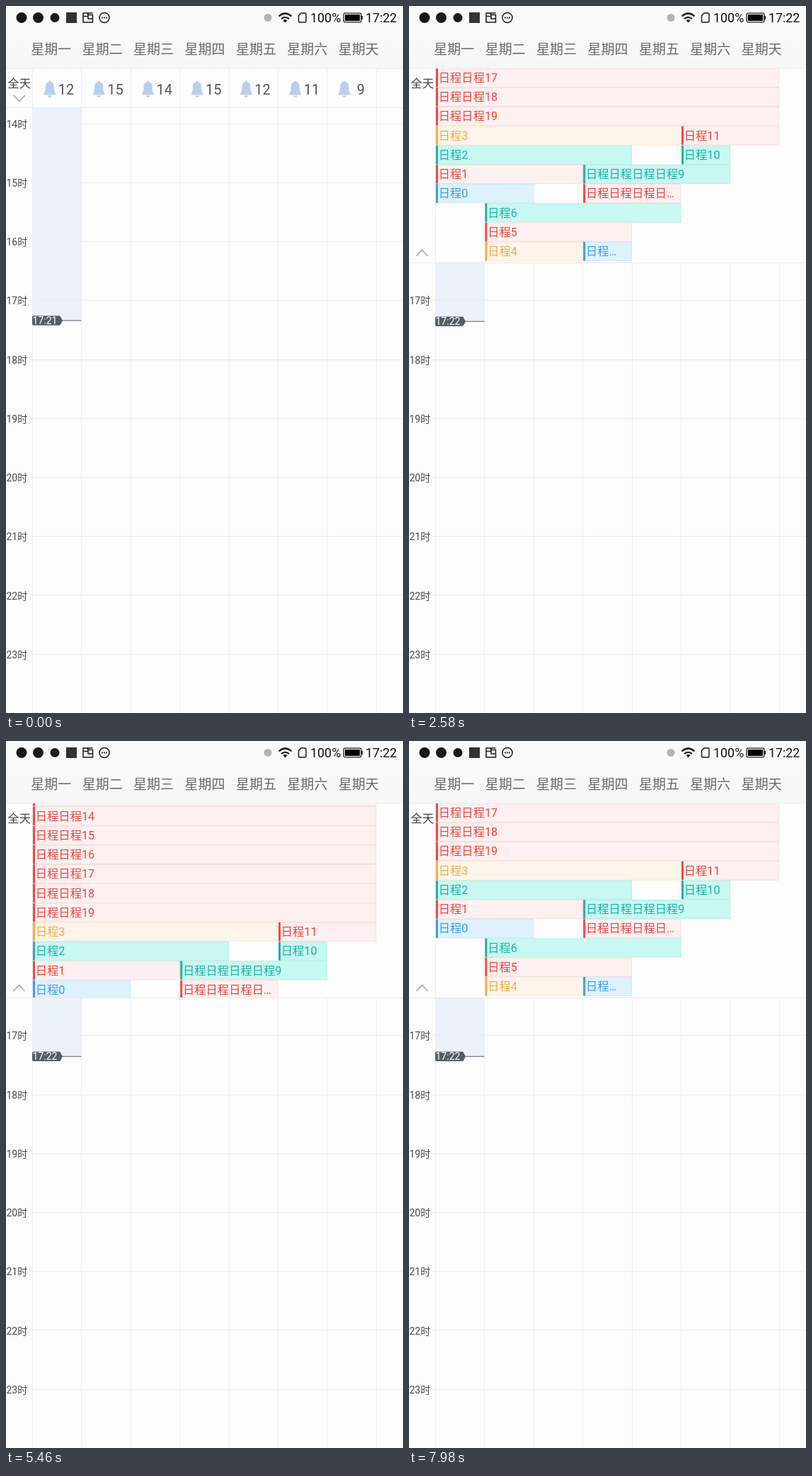
An HTML page that plays this animation: 561x998 px, repeating every 8 s.

```html
<!DOCTYPE html>
<html lang="zh-CN">
<head>
<meta charset="utf-8">
<title>周日程</title>
<style>
html, body { margin: 0; width: 100%; height: 100%; overflow: hidden; background: #fcfcfd; }
svg { display: block; width: 100vw; height: 100vh; }
text { font-family: Roboto, "Noto Sans CJK SC", "Noto Sans CJK", sans-serif; white-space: pre; }
</style>
</head>
<body>
<svg id="stage" viewBox="0 0 561 998">
  <defs>
    <linearGradient id="bar" x1="0" y1="0" x2="0" y2="1">
      <stop offset="0" stop-color="#fafafa"/>
      <stop offset="1" stop-color="#f7f7f7"/>
    </linearGradient>
    <clipPath id="panel"><rect x="0" y="87.5" width="561" height="274.5"/></clipPath>
  </defs>
  <rect width="561" height="998" fill="#fcfcfd"/>
  <g id="grid"></g>
  <g id="now"></g>
  <g id="closed"></g>
  <g id="open">
    <rect y="88" width="561" height="274" fill="#fdfdfd"/>
    <g clip-path="url(#panel)"><g id="events"></g></g>
  </g>
  <g id="head"></g>
  <g id="status" fill="none" stroke="#1a1a1a" stroke-width="1.5">
    <circle cx="22" cy="16.5" r="7.5" fill="#161616" stroke="none"/>
    <circle cx="45.500" cy="16.500" r="7.500" fill="#1a1a1a" stroke="none"/>
    <circle cx="69" cy="16.500" r="6.500" fill="#1a1a1a" stroke="none"/>
    <rect x="85" y="9" width="15" height="15" fill="#333" stroke="none"/>
    <path d="M109 10H114.500L116 12.500H122.500V23H109ZM109 14.500H116V10H122.500M116 14.500V18H122.500"/>
    <circle cx="139" cy="16.500" r="7"/>
    <path d="M135 16.500h1.800m1.300 0h1.800m1.300 0h1.800" stroke-width="1.800"/>
    <circle cx="370" cy="16.500" r="5.500" fill="#b4b4b4" stroke="none"/>
    <path d="M385.500 14.500Q394.500 6.500 403.500 14.500M389 18.200Q394.500 13.500 400 18.200" stroke-width="2.200"/>
    <path d="M391.500 20.200Q394.500 18 397.500 20.200L394.500 23.500Z" fill="#1a1a1a" stroke="none"/>
    <path d="M417 10H422.500Q424 10 424 11.500V21.500Q424 23 422.500 23H415Q413.500 23 413.500 21.500V13.500Z"/>
    <rect x="477.200" y="10.200" width="24.600" height="12.600" rx="1.500" stroke-width="1.300"/>
    <rect x="479" y="12" width="21" height="9" fill="#000" stroke="none"/>
    <rect x="502" y="14" width="2" height="5" fill="#1a1a1a" stroke="none"/>
  </g>
</svg>
<script>
const NS = 'http://www.w3.org/2000/svg';
const $ = id => document.getElementById(id);
const LOOP = 8000, OPEN_AT = 780;
const LEFT = 37, COL = 69.4, ROW = 27.25, TOP = 87.6, MAX = 136.25;
const LINE = '#ececf0';
const colX = c => LEFT + COL * c;

function add(parent, tag, attrs, str) {
  const el = document.createElementNS(NS, tag);
  for (const k in attrs) el.setAttribute(k, attrs[k]);
  if (str !== undefined) el.textContent = str;
  parent.appendChild(el);
  return el;
}
const rect = (g, x, y, width, height, fill, more) => add(g, 'rect', { x, y, width, height, fill, ...more });
const path = (g, d, stroke, more) => add(g, 'path', { d, stroke, fill: 'none', ...more });
const label = (g, x, y, size, fill, str, more) => add(g, 'text', { x, y, 'font-size': size, fill, ...more }, str);

// Hour grid
const grid = $('grid');
const today = rect(grid, LEFT, 144, COL, 300, '#ecf2fa');
for (let c = 0; c < 8; c++) path(grid, `M${Math.round(colX(c))}.5 88V998`, LINE);
for (let h = 0; h < 10; h++) {
  const y = 166 + 83.22 * h;
  path(grid, `M33 ${Math.round(y - 0.3)}.5H561`, LINE);
  label(grid, 0.5, y + 5.8, 14, '#4a4a4a', 14 + h + '时');
}

// Current time marker
const now = $('now');
path(now, 'M78 444H106.500', '#6f757c', { 'stroke-width': 1.2 });
add(now, 'path', { d: 'M39 437.300H75Q77 437.300 77.500 439.500L80 444L77.500 448.700Q77 450.800 75 450.800H39Q37 450.800 37 448.800V439.300Q37 437.300 39 437.300Z', fill: '#555d66' });
const clock = label(now, 37.5, 449, 14, '#fff', '');

// Collapsed all-day strip
const closed = $('closed');
rect(closed, 0, 88, 561, 56, '#fdfdfd');
for (let c = 0; c < 8; c++) path(closed, `M${Math.round(colX(c))}.5 88V144`, LINE);
path(closed, 'M0 143.500H561', '#e9e9ec');
[12, 15, 14, 15, 12, 11, 9].forEach((n, c) => {
  add(closed, 'path', {
    d: 'M0-12Q1.500-12 1.700-10.200Q6-9 6-3.500Q6 3 8.500 6.500Q8.500 8 7 8H-7Q-8.500 8-8.500 6.500Q-6 3-6-3.500Q-6-9-1.700-10.200Q-1.500-12 0-12ZM-3 9H3Q2.500 11.500 0 11.500Q-2.500 11.500-3 9Z',
    fill: '#b9d0ea', transform: `translate(${61.8 + COL * c} 117.500)`
  });
  label(closed, 85 + COL * c, 125, 20, '#555', n, { 'text-anchor': 'middle' });
});

// Expanded all-day events
const INK = {
  red: ['#f04a4a', '#e8463f', '#fdf0f0', '#fadcdc'],
  gold: ['#f6ae45', '#f2ac45', '#fdf5ec', '#f8ead2'],
  teal: ['#22b2a4', '#18b5a6', '#c9f7f2', '#b5efe8'],
  blue: ['#3d9fe8', '#3c9fe4', '#def2fe', '#cde8f8']
};
const events = $('events');
function event(row, from, to, ink, str) {
  const [edge, text, fill, border] = INK[ink];
  const x = colX(from) + 1, y = TOP + ROW * row, w = colX(to) - x;
  rect(events, x + 0.5, y + 0.5, w - 0.5, ROW - 1, fill, { stroke: border });
  rect(events, x, y + 0.3, 3, ROW - 0.8, edge);
  label(events, x + 3.8, y + 19.3, 16.3, text, str);
}
const D = '日程';
event(0, 0, 7, 'red', D.repeat(14) + '…');
for (let i = 1; i < 8; i++) event(i, 0, 7, 'red', D + D + (12 + i));
event(8, 0, 5, 'gold', D + 3);
event(8, 5, 7, 'red', D + 11);
event(9, 0, 4, 'teal', D + 2);
event(9, 5, 6, 'teal', D + 10);
event(10, 0, 3, 'red', D + 1);
event(10, 3, 6, 'teal', D.repeat(4) + 9);
event(11, 0, 2, 'blue', D + 0);
event(11, 3, 5, 'red', D.repeat(3) + '日…');
event(12, 1, 5, 'teal', D + 6);
event(13, 1, 4, 'red', D + 5);
event(14, 1, 3, 'gold', D + 4);
event(14, 3, 4, 'blue', D + '…');
path($('open'), 'M37.500 88V362M0 362.500H561', '#e9e9ec');

// Header
const head = $('head');
rect(head, 0, 0, 561, 34, '#fafafa');
rect(head, 0, 34, 561, 53.5, 'url(#bar)');
path(head, 'M0 88H37M523 88H561', '#ececec');
const topLine = path(head, 'M0 88H561', '#ececec');
[...'一二三四五六天'].forEach((d, i) => label(head, 35.3 + 72.4 * i, 68, 19, '#6a6a6a', '星期' + d));
label(head, 2.3, 115, 16.4, '#444', '全天');
const arrow = path(head, '', '#a8a8a8', { 'stroke-width': 1.6 });

const status = $('status');
label(status, 430, 22.7, 17.9, '#111', '100%', { stroke: 'none' });
label(status, 508, 22.7, 17.8, '#111', '17:22', { stroke: 'none' });

// Scroll gestures: start, end, from, to, ease-out power
const SWIPES = [
  [1900, 2580, 0, MAX, 2.33],
  [3180, 3660, MAX, 0, 2.4],
  [3980, 4380, 0, MAX, 3.35],
  [4780, 5140, MAX, 0, 2.4],
  [5260, 5820, 0, 116, 1.27],
  [6100, 6540, 116, MAX, 1.5]
];
function scrollAt(t) {
  let s = 0;
  for (const [a, b, from, to, pow] of SWIPES) {
    if (t < a) break;
    const p = Math.min(1, (t - a) / (b - a));
    s = from + (to - from) * (1 - Math.pow(1 - p, pow));
  }
  return s;
}

const show = (el, on) => el.setAttribute('display', on ? 'inline' : 'none');
function draw(t) {
  const open = t >= OPEN_AT;
  show($('open'), open);
  show(closed, !open);
  show(topLine, !open);
  today.setAttribute('height', open ? 301 : 300);
  now.setAttribute('transform', `translate(0 ${open ? 1.3 : 0})`);
  clock.textContent = open ? '17:22' : '17:21';
  arrow.setAttribute('d', open ? 'M10.500 353L18.500 344.500L26.500 353' : 'M10.500 126L18.800 134.500L27 126');
  // the screen refreshes every 40 ms
  const tick = Math.floor((t - 20) / 40) * 40 + 20;
  events.setAttribute('transform', `translate(0 ${-scrollAt(tick).toFixed(2)})`);
}

let start;
function frame(ts) {
  if (start === undefined) start = ts;
  draw((ts - start) % LOOP);
  requestAnimationFrame(frame);
}
draw(0);
requestAnimationFrame(frame);
</script>
</body>
</html>
```
